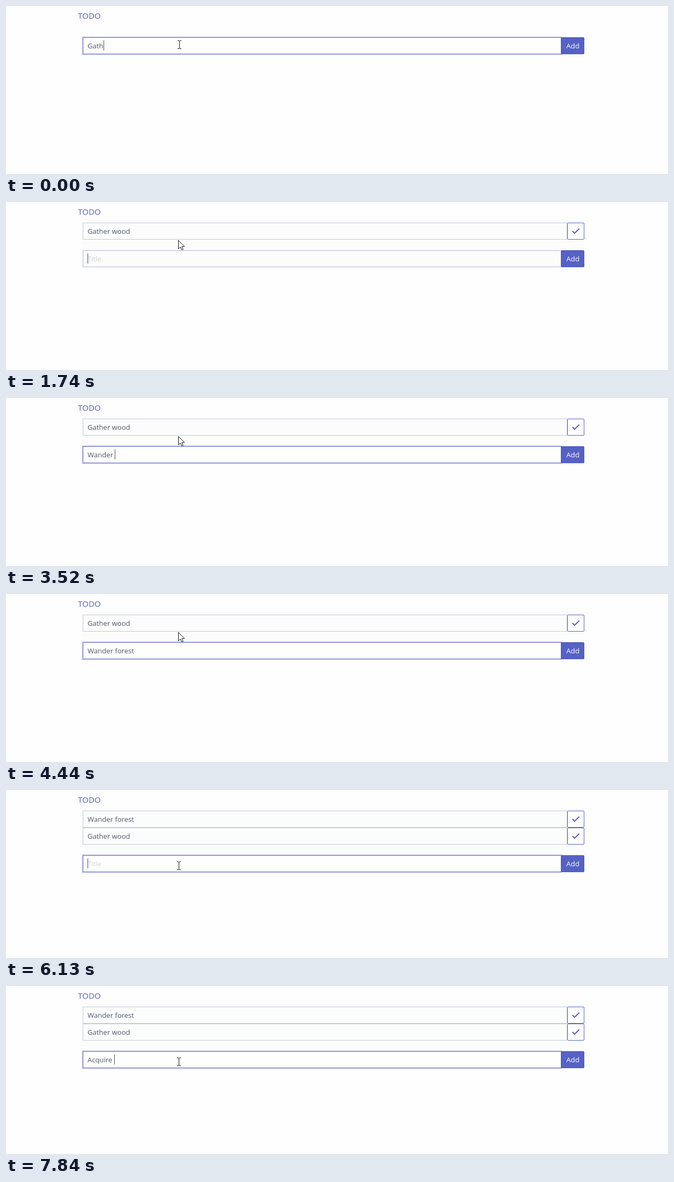
Write an HTML page that moves like this. It is 1242x317 px and loops after 8 s.

```html
<!DOCTYPE html>
<html lang="en">
<head>
<meta charset="utf-8">
<title>Todo list</title>
<style>
  html, body { margin: 0; width: 100%; height: 100%; overflow: hidden; background: #fefefe; }
  svg { display: block; width: 1242px; height: 317px; }
  text { font: 13.15px "Open Sans", "Noto Sans", sans-serif; fill: #50586a; white-space: pre; }
  rect { shape-rendering: crispEdges; }
  .heading { font-size: 15.2px; fill: #5661c4; }
  .add rect { fill: #5661c5; stroke: #4b56bd; shape-rendering: auto; }
  .add text { fill: #fff; text-anchor: middle; }
  .row .field { stroke: #c5c8d4; }
  .row .button { fill: #fefefe; stroke: #5661c5; shape-rendering: auto; }
  .row path { fill: none; stroke: #5661c5; stroke-width: 2; }
  #placeholder { fill: #d2d4da; }
  #caret { fill: #454d5d; }
  #ring { fill: #5661c5; }
</style>
</head>
<body>
<svg viewBox="0 0 1242 317">
  <rect width="1242" height="317" fill="#fefefe"/>
  <text class="heading" x="135" y="24">TODO</text>
  <rect id="panel" x="142" y="39" width="943"/>
  <g id="rows"></g>
  <g id="entry">
    <rect id="ring" x="142" y="-2" width="902" height="36" rx="2"/>
    <rect id="input" x="144.5" y=".5" width="897" height="31"/>
    <text id="placeholder" x="153" y="21">Title</text>
    <text id="typed" x="153" y="21"></text>
    <rect id="caret" y="6" width="1" height="19"/>
    <g class="add">
      <rect x="1041.5" y=".5" width="43" height="31" rx="1.5"/>
      <text x="1063.5" y="21">Add</text>
    </g>
  </g>
  <g id="beam" fill="none" stroke="#111" shape-rendering="crispEdges">
    <path d="M-3 -7.5H0M1 -7.5H4M.5 -7V7M-3 7.5H0M1 7.5H4"/>
  </g>
  <path id="arrow" d="M.5 .5V16.5L4.2 13L6.8 18.4L9.3 17.3L6.9 12H11.8Z"
        fill="#fff" stroke="#111" stroke-linejoin="round"/>
</svg>
<script>
const LOOP = 8000;
const TEXT_X = 153;
const $ = id => document.getElementById(id);

// Each phase: tasks above the input, text being entered, [time, typed length] steps, hidden caret spans
const phases = [
  { start: 0, tasks: [], text: "Gather wood", fill: "#fefefe",
    keys: [[0, 4], [160, 5], [320, 6], [480, 7], [640, 8], [800, 9], [960, 10], [1120, 11]],
    blinks: [[1440, 1740]] },
  { start: 1740, tasks: ["Gather wood"], text: "Wander forest", fill: "#fcfcfc",
    focusAt: 1890, dimBorder: "#b3b6d4", dimRing: 0,
    keys: [[3040, 1], [3200, 3], [3360, 5], [3520, 7], [3680, 9], [3840, 11], [3980, 12], [4140, 13]],
    blinks: [[2300, 2880], [4440, 5050]] },
  { start: 5050, tasks: ["Wander forest", "Gather wood"], text: "Acquire ", fill: "#fbfdfc",
    focusAt: 5210, dimBorder: "#8c93d0", dimRing: .07,
    keys: [[6290, 1], [7070, 2], [7230, 3], [7390, 4], [7550, 5], [7700, 7], [7840, 8]],
    blinks: [[5530, 6130], [6590, 7070]] }
];

const pointers = [
  { start: 0, id: "beam", x: 325, y: 73 },
  { start: 1740, id: "arrow", x: 323, y: 72 },
  { start: 5370, id: "beam", x: 324, y: 143 }
];

const pen = document.createElement("canvas").getContext("2d");
pen.font = '13.15px "Open Sans", "Noto Sans", sans-serif';

const latest = (list, t) => list.filter(item => item.start <= t).pop();
const show = (el, on) => el.setAttribute("display", on ? "inline" : "none");
const set = (el, attrs) => {
  for (const name in attrs) el.setAttribute(name, attrs[name]);
};

function rowMarkup(task, index, fill) {
  return `<g class="row" transform="translate(0 ${39 + 32 * index})">
    <rect class="field" x="144.5" y=".5" width="908" height="31" fill="${fill}"/>
    <text x="${TEXT_X}" y="21">${task}</text>
    <rect class="button" x="1053.5" y=".5" width="31" height="31" rx="1.5"/>
    <path d="M1062.5 15.8L1066.7 20L1075.5 11.2"/>
  </g>`;
}

let shownPhase;
function showPhase(phase) {
  if (phase === shownPhase) return;
  shownPhase = phase;
  const count = phase.tasks.length;
  $("rows").innerHTML = phase.tasks.map((task, i) => rowMarkup(task, i, phase.fill)).join("");
  set($("panel"), { height: count ? 54 + 32 * count : 0, fill: phase.fill });
  set($("entry"), { transform: `translate(0 ${59 + 32 * count})` });
}

function draw(t) {
  const phase = latest(phases, t);
  showPhase(phase);

  const focused = t >= (phase.focusAt || 0);
  set($("input"), {
    fill: focused ? "#fefefd" : phase.fill,
    stroke: focused ? "#5661c5" : phase.dimBorder
  });
  set($("ring"), { opacity: focused ? .2 : phase.dimRing });

  const key = phase.keys.filter(([time]) => time <= t).pop();
  const typed = phase.text.slice(0, key ? key[1] : 0);
  $("typed").textContent = typed;
  show($("placeholder"), !typed);
  set($("caret"), { x: TEXT_X + Math.round(pen.measureText(typed).width) });
  show($("caret"), !phase.blinks.some(([from, to]) => t >= from && t < to));

  const pointer = latest(pointers, t);
  for (const id of ["beam", "arrow"]) show($(id), id === pointer.id);
  set($(pointer.id), { transform: `translate(${pointer.x} ${pointer.y})` });
}

const origin = performance.now();
function tick() {
  draw((performance.now() - origin) % LOOP);
  requestAnimationFrame(tick);
}
tick();
</script>
</body>
</html>
```
